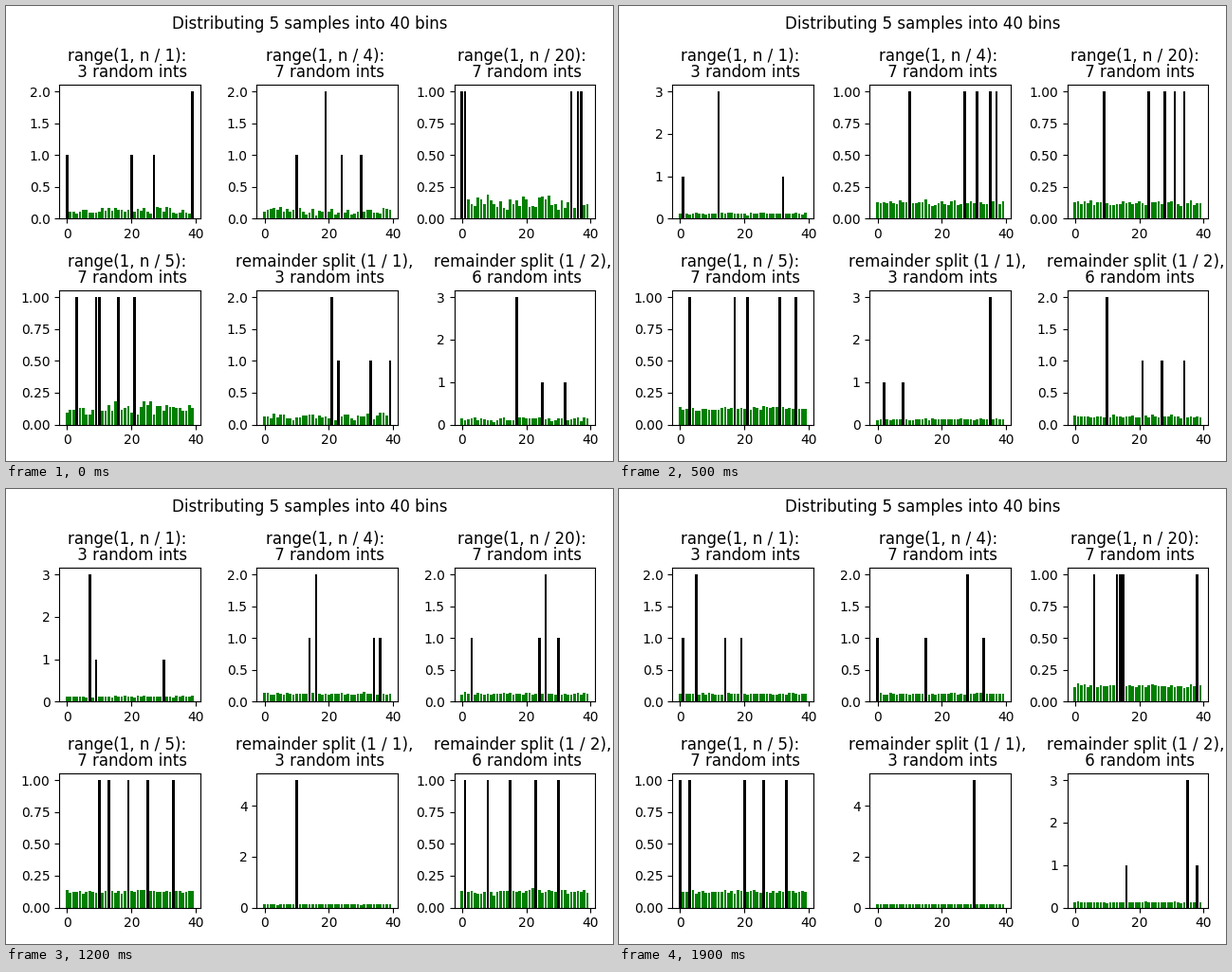
A matplotlib script that plays this animation: 640x480 px, repeating every 2 s.

```python
import numpy as np
import matplotlib.pyplot as plt
from matplotlib.animation import FuncAnimation
from matplotlib.ticker import MaxNLocator

W, H, DPI = 640, 480, 100
BINS, SAMPLES, ROUNDS = 40, 5, 110
STEPS, INTERVAL = 20, 100
TOP, BOTTOM, RIGHT = 83.4, 441.5, 621.2     # plot area in pixels
ROW_GAP = 76

# title, number of random ints, cycle of the tallest bar's height
PANELS = [
    ("range(1, n / 1):", 3, (2, 3, 3, 2, 3, 3, 3, 3)),
    ("range(1, n / 4):", 7, (2, 1, 1, 2, 2, 1, 1, 1)),
    ("range(1, n / 20):", 7, (1, 1, 1, 1, 2, 1, 1, 2)),
    ("range(1, n / 5):", 7, (1, 1, 1, 1, 1, 1, 2, 2)),
    ("remainder split (1 / 1),", 3, (2, 3, 4, 5, 5, 3, 4, 2)),
    ("remainder split (1 / 2),", 6, (3, 1, 2, 3, 1, 2, 2, 3)),
]

plt.rcParams["text.kerning_factor"] = 6
rng = np.random.default_rng(40)


def peak_at(panel, step):
    peaks = panel[2]
    return peaks[step % len(peaks)]


def sample(peak):
    """Counts per bin: one bin takes the peak, the others one sample each."""
    counts = np.zeros(BINS, int)
    bins = rng.choice(BINS, SAMPLES - peak + 1, replace=False)
    counts[bins] = 1
    counts[bins[0]] = peak
    return counts


def running_mean():
    """Mean count per bin, settling as the rounds add up."""
    hits = rng.multinomial(SAMPLES * ROUNDS, np.full(BINS, 1 / BINS), STEPS)
    rounds = ROUNDS * np.arange(1, STEPS + 1)
    return hits.cumsum(axis=0) / rounds[:, None]


draws = [[sample(peak_at(p, s)) for s in range(STEPS)] for p in PANELS]
means = [running_mean() for _ in PANELS]

fig, axes = plt.subplots(2, 3, figsize=(W / DPI, H / DPI), dpi=DPI)
fig.suptitle(f"Distributing {SAMPLES} samples into {BINS} bins")
x = np.arange(BINS)


def place_axes(step):
    """Leave room for the widest tick label in the first column."""
    wide = any(peak_at(p, step) == 1 for p in PANELS[::3])
    left, col_gap = (56.3, 59.6) if wide else (47.3, 59.8)
    width = (RIGHT - left - 2 * col_gap) / 3
    height = (BOTTOM - TOP - ROW_GAP) / 2
    fig.subplots_adjust(left=left / W, right=RIGHT / W,
                        top=1 - TOP / H, bottom=1 - BOTTOM / H,
                        wspace=col_gap / width, hspace=ROW_GAP / height)


def draw(step):
    place_axes(step)
    for i, (ax, (name, ints, _)) in enumerate(zip(axes.flat, PANELS)):
        ax.clear()
        ax.bar(x, means[i][step], color="green")
        ax.bar(x, draws[i][step], color="black")
        ax.set_xticks([0, 20, 40])
        ax.yaxis.set_major_locator(MaxNLocator(5, steps=[1, 2, 2.5, 5, 10]))
        ax.set_title(f"{name} \n {ints} random ints", linespacing=0.92)
    return []


anim = FuncAnimation(fig, draw, frames=STEPS, interval=INTERVAL,
                     init_func=lambda: draw(0), repeat=True, repeat_delay=0)
plt.show()
```
